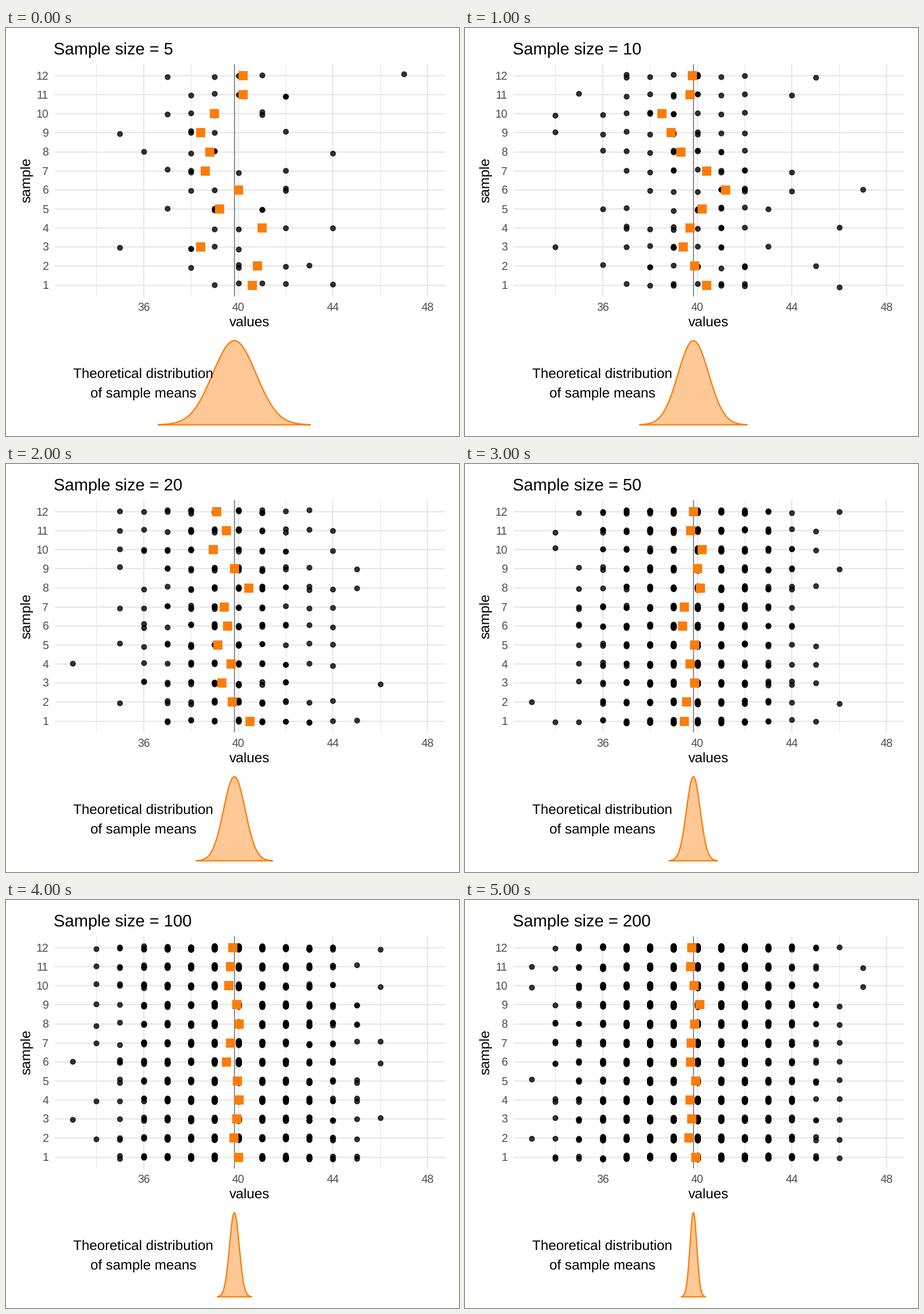
A matplotlib script for the animation above (6000 ms loop, 789 px wide and 710 px high).

```python
import math

import numpy as np
import matplotlib.pyplot as plt
from matplotlib.animation import FuncAnimation
from matplotlib.colors import to_rgba

W, H, DPI = 789, 710, 100
PT = 72 / DPI
ORANGE = "#fe7c08"
MU, SD = 39.836, 2.05
SPREAD = 2.2          # spread of single values
JITTER = 3.4          # pixels
BASE, PEAK = 690.5, 544.2
TOP, BOTTOM, LEFT, RIGHT = 63, 467, 85, 765

plt.rcParams["font.family"] = "Liberation Sans"
plt.rcParams["text.hinting"] = "none"

# Sample means for each sample size, from sample 12 down to 1.
MEANS = {
    5: [40.2, 40.2, 39, 38.4, 38.8, 38.6, 40, 39.2, 41, 38.4, 40.8, 40.6],
    10: [39.8, 39.7, 38.5, 38.9, 39.3, 40.4, 41.2, 40.2, 39.7, 39.4, 39.9,
         40.4],
    20: [39.1, 39.5, 38.95, 39.85, 40.45, 39.4, 39.55, 39.15, 39.7, 39.3,
         39.75, 40.5],
    50: [39.84, 39.72, 40.2, 40.02, 40.14, 39.46, 39.38, 39.88, 39.7, 39.88,
         39.54, 39.46],
    100: [39.77, 39.66, 39.59, 39.95, 40.04, 39.66, 39.5, 39.97, 40.04,
          39.95, 39.82, 40.02],
    200: [39.76, 39.73, 39.86, 40.12, 39.88, 39.75, 39.72, 39.95, 39.69,
          39.76, 39.65, 39.95],
}
SIZES = list(MEANS)
VALUES = np.arange(33, 48)


def px(v):
    return 239.6 + 41.23 * (v - 36)


def py(row):
    return 447.5 - 33.13 * (row - 1)


def bell(z):
    return np.exp(-z * z / 2)


def sample(n, mean, rng):
    """Whole values around a mean, one from each of n equal quantile bands."""
    cdf = np.cumsum(bell((VALUES - mean) / SPREAD))
    u = (np.arange(n) + rng.random(n)) / n
    return VALUES[np.searchsorted(cdf / cdf[-1], u)]


def dots(n):
    rng = np.random.default_rng(n)
    pts = []
    for row, mean in zip(range(12, 0, -1), MEANS[n]):
        y = py(row) + rng.uniform(-JITTER, JITTER, n)
        pts.append(np.column_stack([px(sample(n, mean, rng)), y]))
    return np.concatenate(pts)


def curve(n):
    z = np.linspace(-3.5, 3.5, 201)
    x = px(MU + z * SD / math.sqrt(n))
    y = BASE - (BASE - PEAK) * bell(z)
    return np.column_stack([np.r_[x[0], x, x[-1]], np.r_[BASE, y, BASE]])


fig = plt.figure(figsize=(W / DPI, H / DPI), dpi=DPI, facecolor="white")
ax = fig.add_axes([0, 0, 1, 1])
ax.set_xlim(0, W)
ax.set_ylim(H, 0)
ax.axis("off")


def label(x, y, s, size, color="black", ha="center", **kw):
    return ax.text(x, y, s, fontsize=size * PT, color=color, ha=ha,
                   va="baseline", zorder=9, **kw)


def line(xs, ys, width, color="#e8e8e8", z=1):
    ax.plot(xs, ys, color=color, lw=width * PT, solid_capstyle="butt",
            zorder=z)


for v in range(34, 49, 2):
    major = v % 4 == 0
    line([px(v)] * 2, [TOP, BOTTOM], 2.3 if major else 1.2)
    if major:
        label(px(v), 492.5, str(v), 19.55, "#4d4d4d")
for r in range(1, 13):
    line([LEFT, RIGHT], [py(r)] * 2, 2.3)
    label(74, py(r) + 7, str(r), 19.55, "#4d4d4d", "right")
line([px(MU)] * 2, [TOP, BOTTOM], 2.2, (0, 0, 0, .42), 4)

label(424.5, 519, "values", 24.4)
label(42, 264.5, "sample", 24.4, rotation=90, rotation_mode="anchor")
label(239, 609, "Theoretical distribution", 24.3)
label(239, 643.5, "of sample means", 24.3)
title = label(83, 45.5, "", 29.15, ha="left")

ink = (0, 0, 0, .8)
points = ax.scatter([], [], s=(8.9 * PT) ** 2, facecolor=[ink],
                    edgecolor=[ink], linewidth=1.2 * PT, zorder=3)
means = ax.scatter([], [], s=(15.5 * PT) ** 2, marker="s", color=ORANGE,
                   linewidth=0, zorder=5)
hill, = ax.fill([0, 1, 1], [0, 0, 1], facecolor=to_rgba(ORANGE, .42),
                edgecolor=ORANGE, lw=2.3 * PT, joinstyle="round", zorder=6)


def draw(i):
    n = SIZES[i]
    title.set_text(f"Sample size = {n}")
    points.set_offsets(dots(n))
    means.set_offsets([(px(m), py(12 - k)) for k, m in enumerate(MEANS[n])])
    hill.set_xy(curve(n))
    return title, points, means, hill


anim = FuncAnimation(fig, draw, frames=len(SIZES), interval=1000,
                     init_func=lambda: draw(0), repeat=True, repeat_delay=0)
plt.show()
```
